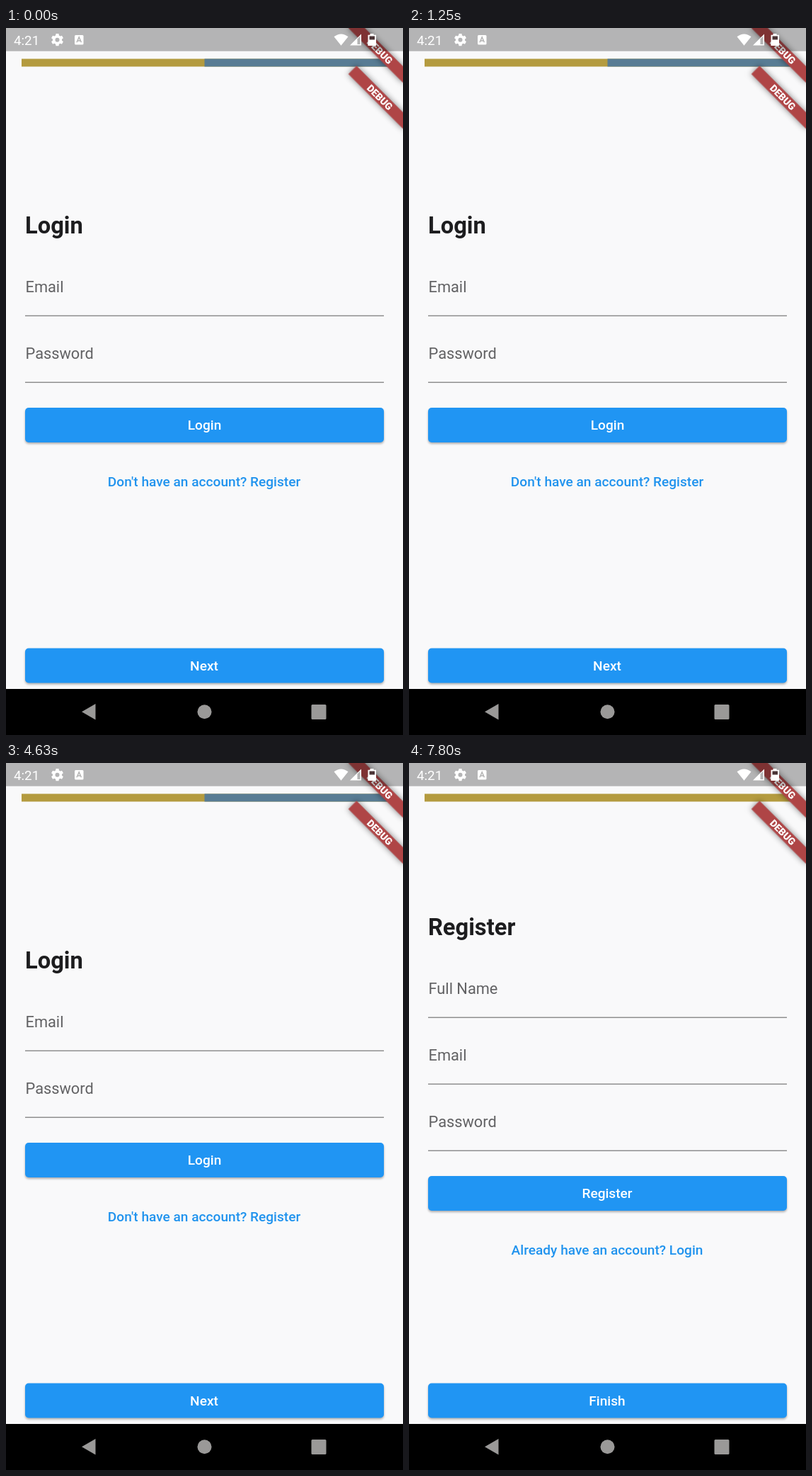
Animation, 561 px wide and 998 px high, one loop 8000 ms. Source, as an HTML page:

```html
<!DOCTYPE html>
<html lang="en">
<head>
<meta charset="utf-8">
<title>Login and register flow</title>
<style>
  html, body { margin: 0; width: 100%; height: 100%; overflow: hidden; background: #f9f9fa; }
  svg { display: block; width: 100%; height: 100%; font-family: Roboto, sans-serif; }
  .title { font-size: 32.7px; font-weight: 700; fill: #1d1d1f; }
  .label { font-size: 21.8px; fill: #626264; }
  .line { stroke: #8f8f90; stroke-width: 1.4; }
  .button { fill: #2095f3; filter: drop-shadow(0 2px 1.5px rgba(0, 0, 0, .3)); }
  .caption, .link { font-size: 19.1px; font-weight: 500; text-anchor: middle; fill: #fff; }
  .link { fill: #2093ee; }
  .banner rect { fill: #af4546; filter: drop-shadow(0 0 4px rgba(0, 0, 0, .5)); }
  .banner text { font-size: 13.9px; font-weight: 900; text-anchor: middle; fill: #fff; }
  .clock { font-size: 18.8px; }

  .login { animation: leave 8s step-end infinite; }
  .register { animation: enter 8s step-end infinite; }
  .press { fill: #fff; animation: press 8s linear infinite; }
  @keyframes leave { 0% { visibility: visible; } 60.5%, 100% { visibility: hidden; } }
  @keyframes enter { 0% { visibility: hidden; } 60.5%, 100% { visibility: visible; } }
  @keyframes press { 0%, 60.49% { opacity: 0; } 60.5% { opacity: .05; } 63.6%, 100% { opacity: 0; } }
</style>
</head>
<body>
<svg viewBox="0 0 561 998" preserveAspectRatio="none">
  <defs>
    <rect id="button" class="button" x="27" width="507" height="49" rx="5"/>
    <path id="line" class="line" d="M27 0H534"/>
    <g id="banner" class="banner">
      <g transform="rotate(45)">
        <rect x="-54.6" y="38.2" width="109.2" height="16.4"/>
        <text y="51.4">DEBUG</text>
      </g>
    </g>
    <path id="tooth" d="M-2 -8.6H2L2.6 -4H-2.6Z"/>
  </defs>

  <rect width="561" height="998" fill="#f9f9fa"/>
  <rect x="22" y="43.5" width="517" height="11" fill="#b49b3f"/>

  <g class="login">
    <rect x="280.5" y="43.5" width="258.5" height="11" fill="#587c94"/>
    <text class="title" x="27" y="290">Login</text>
    <text class="label" x="27.5" y="373">Email</text>
    <use href="#line" y="406.3"/>
    <text class="label" x="27.5" y="467">Password</text>
    <use href="#line" y="500.3"/>
    <use href="#button" y="536"/>
    <text class="caption" x="280.5" y="567.3">Login</text>
    <text class="link" x="280" y="646.5">Don't have an account? Register</text>
  </g>

  <g class="register">
    <text class="title" x="27" y="243">Register</text>
    <text class="label" x="27.5" y="326">Full Name</text>
    <use href="#line" y="359.3"/>
    <text class="label" x="27.5" y="420">Email</text>
    <use href="#line" y="453.3"/>
    <text class="label" x="27.5" y="514">Password</text>
    <use href="#line" y="547.3"/>
    <use href="#button" y="583"/>
    <text class="caption" x="280" y="614.3">Register</text>
    <text class="link" x="280" y="693.5">Already have an account? Login</text>
  </g>

  <use href="#button" y="875.5"/>
  <rect class="press" x="27" y="875.5" width="507" height="49" rx="5"/>
  <text class="caption login" x="280" y="906.7">Next</text>
  <text class="caption register" x="280" y="906.7">Finish</text>

  <use href="#banner" x="561" y="65"/>
  <use href="#banner" x="561"/>

  <!-- Status bar -->
  <rect width="561" height="32.7" fill="#000" opacity=".28"/>
  <g fill="#fff">
    <text class="clock" x="11" y="24">4:21</text>
    <g transform="translate(72.5 16.7)">
      <circle r="4.8" fill="none" stroke="#fff" stroke-width="3.6"/>
      <use href="#tooth"/>
      <use href="#tooth" transform="rotate(60)"/>
      <use href="#tooth" transform="rotate(120)"/>
      <use href="#tooth" transform="rotate(180)"/>
      <use href="#tooth" transform="rotate(240)"/>
      <use href="#tooth" transform="rotate(300)"/>
    </g>
    <rect x="97" y="10" width="12.5" height="13.5" rx="1.5"/>
    <path d="M100 20.3L103.2 12.8L106.4 20.3M101.2 18H105.2" fill="none" stroke="#b3b3b3" stroke-width="1.5"/>
    <path d="M463.5 12.3Q473.5 4.5 483.5 12.3L473.5 24.8Z"/>
    <path d="M486 24.5L502 8.5V24.5Z"/>
    <path d="M496.5 15.5L500.5 11.5V23H496.5Z" fill="#b3b3b3"/>
    <path d="M514.5 8H519.5V9.7H523V25H511.5V9.7H514.5Z"/>
    <rect x="513.5" y="11.5" width="7.5" height="5" fill="#4a3436"/>
  </g>

  <!-- Navigation bar -->
  <rect y="933" width="561" height="65"/>
  <g fill="#9a9998">
    <path d="M107 965.2L126.5 954V976.5Z"/>
    <circle cx="280.5" cy="965.2" r="10"/>
    <rect x="431.5" y="955" width="21" height="21" rx="1.5"/>
  </g>
</svg>
</body>
</html>
```
